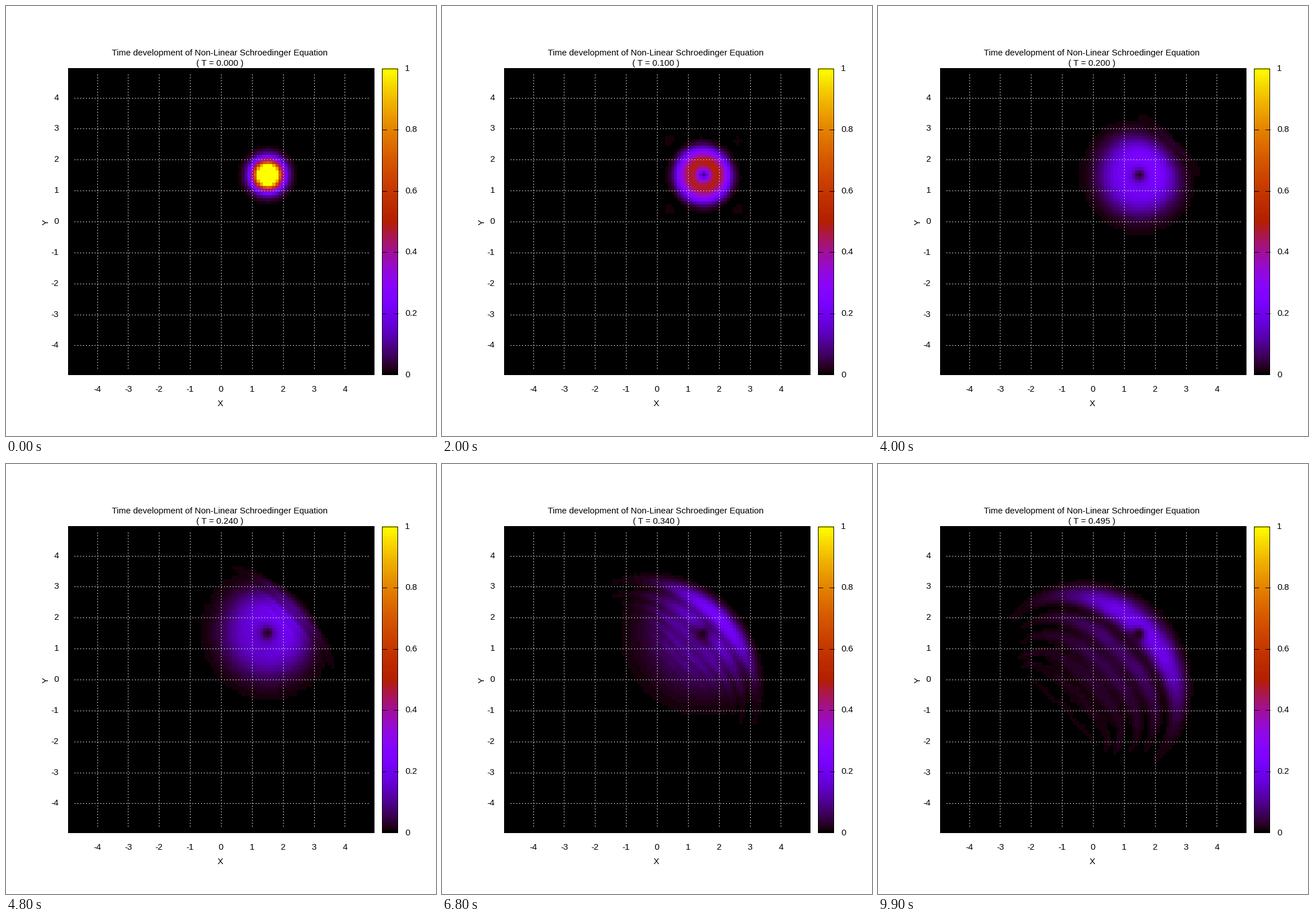
Animation, 748 px wide and 748 px high, one loop 10 s. Source, as a matplotlib script:

```python
import numpy as np
import matplotlib.pyplot as plt
from matplotlib.animation import FuncAnimation
from matplotlib.colors import ListedColormap
from matplotlib.patches import Rectangle

SIZE, DPI = 748, 100
FRAMES, INTERVAL = 100, 100
PX = 72 / DPI                       # one pixel in points
LEFT, RIGHT, TOP, BOTTOM = 108, 641, 108, 641
MID, UNIT = 374.5, 533 / 9.9        # plot centre and pixels per unit

# Physics: wave packet in a steep round trap with a pinned obstacle
N, DX = 100, 0.1
DT, SUBSTEPS = 0.0005, 10
G = 10.0
X0 = Y0 = 1.5


def simulate():
    """Split-step solution of the non-linear equation, one density per frame."""
    x = (np.arange(N) - (N - 1) / 2) * DX
    xx, yy = np.meshgrid(x, x)
    trap = np.minimum((np.hypot(xx, yy) / 2.45) ** 10, 1000)
    spike = (abs(xx - X0) < 0.06) & (abs(yy - Y0) < 0.06)
    pot = trap + 100.0 * spike
    # Kinetic energy of the fourth-order difference Laplacian
    th = 2 * np.pi * np.arange(N) / N
    hop = (15 - 16 * np.cos(th) + np.cos(2 * th)) / (12 * DX ** 2)
    drift = np.exp(-1j * DT * (hop[:, None] + hop[None, :]))
    psi = np.sqrt(6 / np.pi) * np.exp(-3 * ((xx - X0) ** 2 + (yy - Y0) ** 2))
    psi = psi.astype(complex)

    def kick(p):
        return p * np.exp(-0.5j * DT * (pot + G * abs(p) ** 2))

    out = []
    for _ in range(FRAMES):
        n = abs(psi) ** 2
        out.append((n[1:, 1:] + n[1:, :-1] + n[:-1, 1:] + n[:-1, :-1]) / 4)
        for _ in range(SUBSTEPS):
            psi = kick(np.fft.ifft2(drift * np.fft.fft2(kick(psi))))
    return out


def make_cmap(steps=128):
    g = np.linspace(0, 1, steps)
    blue = np.clip(np.sin(2 * np.pi * g), 0, 1)
    return ListedColormap(np.column_stack([np.sqrt(g), g ** 3, blue]))


plt.rcParams["font.family"] = "Liberation Sans"
fig = plt.figure(figsize=(SIZE / DPI, SIZE / DPI), dpi=DPI, facecolor="white")
ax = fig.add_axes([0, 0, 1, 1])
ax.axis("off")

density = simulate()
cmap = make_cmap()


def label(x, y, s, ha="center", **kw):
    return ax.text(x, y, s, ha=ha, va=kw.pop("va", "baseline"),
                   fontsize=15 * PX, color="black", **kw)


def line(xs, ys, color="black", **kw):
    ax.plot(xs, ys, color=color, lw=PX, antialiased=False,
            solid_capstyle="butt", **kw)


def image(data, left, right):
    return ax.imshow(data, cmap=cmap, vmin=0, vmax=1, origin="lower",
                     extent=(left, right, BOTTOM, TOP), aspect="auto",
                     interpolation="nearest")


def frame_box(left, right):
    ax.add_patch(Rectangle((left + 0.5, TOP + 0.5), right - left - 1,
                           BOTTOM - TOP - 1, fill=False, ec="black", lw=PX,
                           antialiased=False, zorder=4))


field = image(density[0], LEFT, RIGHT)
frame_box(LEFT, RIGHT)

# Grid and axis labels
dots = dict(color="#d0d0d0", linestyle=(0, (2, 3)), zorder=3)
for i in range(-4, 5):
    gx = np.floor(MID + i * UNIT) + 0.5
    gy = np.floor(MID - i * UNIT) + 0.5
    line([gx, gx], [630, 119], **dots)
    line([119, 630], [gy, gy], **dots)
    label(MID + i * UNIT - 0.5, 671, str(i))
    label(92, MID - i * UNIT + 4.5, str(i), ha="right")
label(372.5, 696.5, "X")
label(69.5, 376, "Y", rotation=90, va="center")

# Colour bar
image(np.linspace(0, 1, 128)[:, None], 654, 682)
frame_box(654, 682)
for k in range(6):
    ty = BOTTOM - k / 5 * (BOTTOM - TOP)
    label(694, ty + 4.5, f"{k / 5:g}", ha="left")
    if 0 < k < 5:
        ry = np.floor(ty) + 0.5
        line([654, 662], [ry, ry], zorder=4)
        line([674, 682], [ry, ry], zorder=4)

label(372, 86, "Time development of Non-Linear Schroedinger Equation")
clock = label(372.5, 104, "( T = 0.000 )")

ax.set_xlim(0, SIZE)
ax.set_ylim(SIZE, 0)


def update(i):
    field.set_data(density[i])
    clock.set_text(f"( T = {i * DT * SUBSTEPS:.3f} )")
    return field, clock


anim = FuncAnimation(fig, update, frames=FRAMES, interval=INTERVAL,
                     repeat=True, repeat_delay=0)
plt.show()
```
